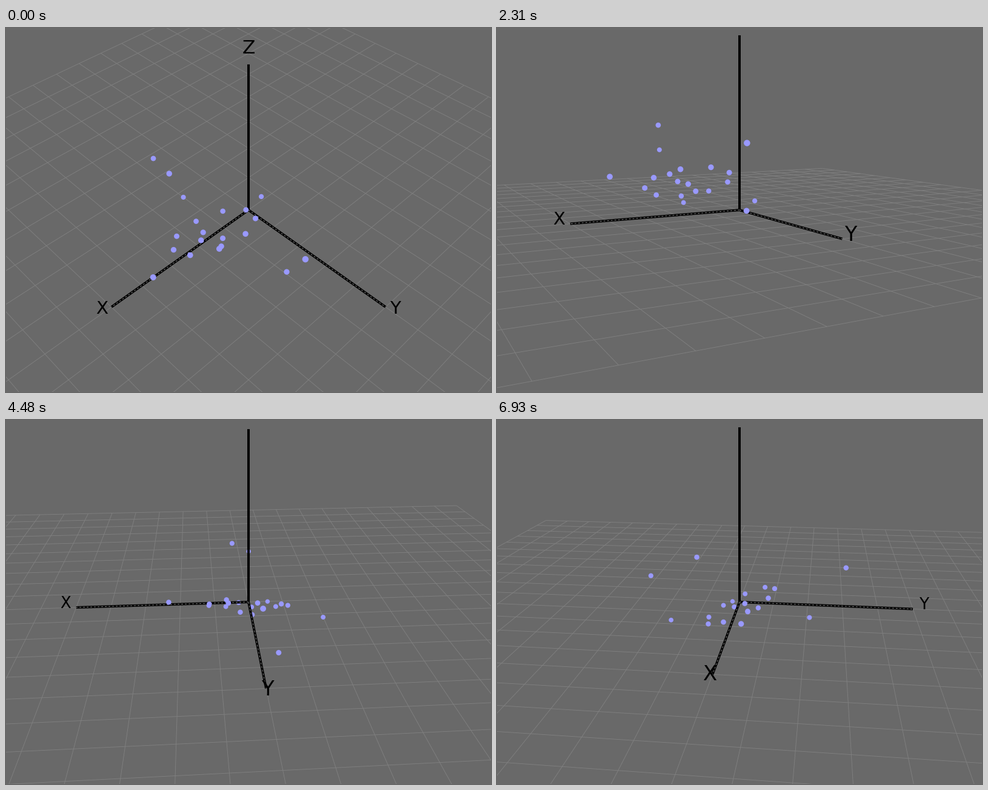
A matplotlib script that plays this animation: 800 px wide and 600 px high, repeating every 7 s.

```python
import numpy as np
import matplotlib.pyplot as plt
from matplotlib.animation import FuncAnimation
from matplotlib.collections import LineCollection

W, H, DPI = 800, 600, 100
PT = 72 / DPI                                # points per pixel
FRAMES, INTERVAL = 100, 70
FOCAL = H / 2 / np.tan(np.radians(15))       # 30 degree field of view
DISTANCE = 4                                 # in axis lengths
CENTER_FRAME = 41                            # the cloud jumps to its mean

# Camera drags: first frame, last frame, (azimuth, elevation) reached
START = np.array([45, 45])
DRAGS = [
    (6, 18, (37.2, 5.4)),
    (19, 37, (63.3, 8.9)),
    (49, 53, (70, 8.2)),
    (53, 58, (79, 34)),
    (58, 64, (85.4, 23.2)),
    (64, 73, (48.4, 31)),
    (81, 92, (5, 18.2)),
    (98, 99, (7, 19.2)),
]


def camera(frame):
    """Azimuth and elevation in radians; each drag slows down to its end."""
    angles = START
    for first, last, target in DRAGS:
        t = np.clip((frame - first) / (last - first), 0, 1)
        angles = angles + (target - angles) * np.sin(np.pi / 2 * t)
    return np.radians(angles)


def ring(count, center, radii, phase, tilt):
    """Points on a wavy ellipse; tilt is the angle of its highest point."""
    angle = phase + np.arange(count) * 2 * np.pi / count
    wave = np.stack([np.cos(angle), np.sin(angle), np.cos(angle - tilt)], axis=1)
    return center + wave * radii


def make_cloud():
    outer = ring(9, (.38, .12, .195), (.24, .20, .10), -.35, 1.47)
    inner = ring(4, (.43, .16, .20), (.075, .07, .05), 0, 0)
    strays = [(.454, -.121, .499), (.329, -.426, .340), (.837, .179, .254),
              (.210, -.340, .016), (.350, .724, .436), (-.098, .009, .049),
              (.242, .525, .084)]
    return np.vstack([outer, inner, strays])


def view_axes(azimuth, elevation):
    """Unit vectors to the right, up and toward the viewer."""
    ca, sa = np.cos(azimuth), np.sin(azimuth)
    ce, se = np.cos(elevation), np.sin(elevation)
    return np.array([(-sa, ca, 0),
                     (-ca * se, -sa * se, ce),
                     (ca * ce, sa * ce, se)])


def project(points, view):
    """Screen positions and depths of 3D points."""
    cam = np.asarray(points) @ view.T
    depth = DISTANCE - cam[..., 2]
    scale = FOCAL / depth
    xy = np.stack([W / 2 + cam[..., 0] * scale,
                   H / 2 - cam[..., 1] * scale], axis=-1)
    return xy, depth


def behind_axis(points, xy, view):
    """True where a point lies behind the axis closest to it on screen."""
    gaps = np.linalg.norm(xy[:, None, None] - project(RODS, view)[0], axis=-1)
    nearest = gaps.min(axis=2).argmin(axis=1)
    parts = points * view[2]
    facing = parts.sum(axis=1, keepdims=True) - parts
    return facing[np.arange(len(points)), nearest] < 0


CLOUD = make_cloud()
UNIT = np.eye(3)
RODS = UNIT[:, None] * np.linspace(0, 1, 60)[:, None]
TICKS = np.linspace(-2, 2, 21)
GRID = np.array([[(t, -2, 0), (t, 2, 0)] for t in TICKS]
                + [[(-2, t, 0), (2, t, 0)] for t in TICKS])
AXES = np.stack([np.zeros((3, 3)), UNIT], axis=1)

fig = plt.figure(figsize=(W / DPI, H / DPI), dpi=DPI, facecolor="#696969")
ax = fig.add_axes([0, 0, 1, 1])
ax.set_xlim(0, W)
ax.set_ylim(H, 0)
ax.axis("off")

grid = LineCollection([], colors="#808080", linewidths=0.9 * PT, zorder=1)
rods = LineCollection([], colors="black", linewidths=4 * PT, zorder=3)
glints = LineCollection([], colors="#808080", linewidths=PT,
                        linestyles=[(0, (3, 3))], zorder=4)
for lines in (grid, rods, glints):
    ax.add_collection(lines, autolim=False)
back, front = (ax.scatter([], [], color="#9999ff", linewidths=0, zorder=z)
               for z in (2, 5))
labels = [ax.text(0, 0, name, family="DejaVu Sans", color="black",
                  ha="center", va="baseline", zorder=6) for name in "XYZ"]


def draw(frame):
    view = view_axes(*camera(frame))
    grid.set_segments(project(GRID, view)[0])
    axis_xy = project(AXES, view)[0]
    rods.set_segments(axis_xy)
    glints.set_segments(axis_xy[:2])

    points = CLOUD - CLOUD.mean(axis=0) if frame >= CENTER_FRAME else CLOUD
    xy, depth = project(points, view)
    sizes = (33 / depth * PT) ** 2
    hidden = behind_axis(points, xy, view)
    for dots, mask in ((back, hidden), (front, ~hidden)):
        dots.set_offsets(xy[mask])
        dots.set_sizes(sizes[mask])

    for label, spot, d in zip(labels, *project(UNIT * 1.06, view)):
        label.set_position(spot)
        label.set_fontsize(102 / d * PT)
    return [grid, rods, glints, back, front, *labels]


anim = FuncAnimation(fig, draw, frames=FRAMES, interval=INTERVAL, repeat=True)
plt.show()
```
